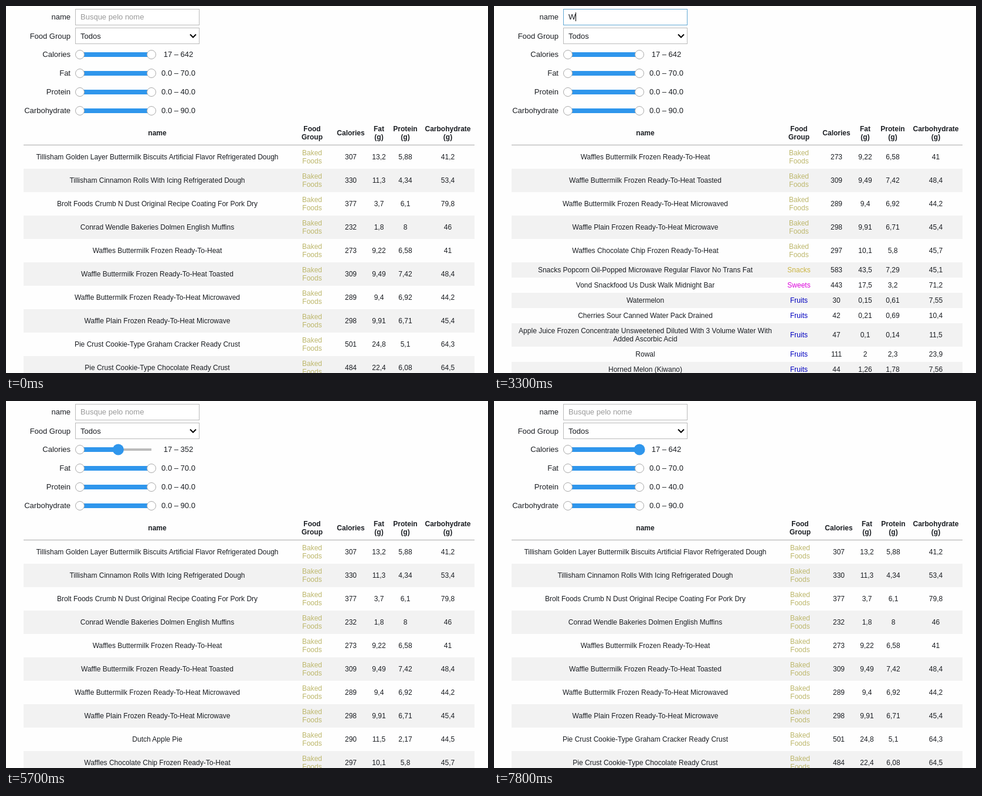
These frames come from a looping animation (822x627 px, 8000 ms). An HTML page:

```html
<!DOCTYPE html>
<html lang="en">
<head>
<meta charset="utf-8">
<title>Food table filter</title>
<style>
html, body { margin: 0; width: 100%; height: 100%; overflow: hidden; background: #fefefe; }
svg { display: block; font-family: "Liberation Sans", Arial, sans-serif; font-size: 13px; fill: #1b1e23; }
.table { font-size: 12px; text-anchor: middle; }
.head { font-weight: bold; }
.box { fill: #fff; stroke: #bbb; }
.knob { fill: #fff; stroke: #aaa; }
</style>
</head>
<body>
<svg id="stage" width="822" height="627" viewBox="0 0 822 627"></svg>
<script>
const LOOP = 8000;
const BLUE = '#2f96ec';
const COLORS = { 'Baked Foods': '#bdb76b', Snacks: '#cbb440', Sweets: '#dc00dc', Fruits: '#0000c0' };

// name | calories | fat | protein | carbohydrate, "#" starts a group, "/" breaks a line
const FOODS = `
#Baked Foods
Tillisham Golden Layer Buttermilk Biscuits Artificial Flavor Refrigerated Dough|307|13,2|5,88|41,2
Tillisham Cinnamon Rolls With Icing Refrigerated Dough|330|11,3|4,34|53,4
Brolt Foods Crumb N Dust Original Recipe Coating For Pork Dry|377|3,7|6,1|79,8
Conrad Wendle Bakeries Dolmen English Muffins|232|1,8|8|46
Waffles Buttermilk Frozen Ready-To-Heat|273|9,22|6,58|41
Waffle Buttermilk Frozen Ready-To-Heat Toasted|309|9,49|7,42|48,4
Waffle Buttermilk Frozen Ready-To-Heat Microwaved|289|9,4|6,92|44,2
Waffle Plain Frozen Ready-To-Heat Microwave|298|9,91|6,71|45,4
Pie Crust Cookie-Type Graham Cracker Ready Crust|501|24,8|5,1|64,3
Pie Crust Cookie-Type Chocolate Ready Crust|484|22,4|6,08|64,5
Dutch Apple Pie|290|11,5|2,17|44,5
Waffles Chocolate Chip Frozen Ready-To-Heat|297|10,1|5,8|45,7
Bread White Wheat|238|2,15|10,7|43,9
Bagels Wheat|250|1,53|10,2|48,9
Crackers Wheat Regular|455|16,4|7,3|70,7
#Snacks
Snacks Popcorn Oil-Popped Microwave Regular Flavor No Trans Fat|583|43,5|7,29|45,1
#Sweets
Ice Creams Vanilla Light|180|4,83|4,78|29,5
Ice Creams Vanilla Rich|249|16,2|3,5|22,3
Desserts Flan Caramel Custard Prepared-From-Recipe|145|4,03|4,53|22,8
Ice Creams Vanilla|207|11|3,5|23,6
Ice Creams Vanilla Light Soft-Serve|126|2,6|4,9|21,8
Sherbet Orange|144|2|1,1|30,4
Vond Snackfood Us Dusk Walk Midnight Bar|443|17,5|3,2|71,2
#Fruits
Watermelon|30|0,15|0,61|7,55
Cherries Sour Canned Water Pack Drained|42|0,21|0,69|10,4
Apple Juice Frozen Concentrate Unsweetened Diluted With 3 Volume Water With/Added Ascorbic Acid|47|0,1|0,14|11,5
Rowal|111|2|2,3|23,9
Horned Melon (Kiwano)|44|1,26|1,78|7,56`;

let group = '';
const foods = [];
for (const line of FOODS.trim().split('\n')) {
  if (line[0] === '#') { group = line.slice(1); continue; }
  const [name, ...nums] = line.split('|');
  foods.push({ name, group, nums, kcal: +nums[0] });
}
// "Horned Melon (Kiwano)" matches through its last word, as does every listed "wa"
const matches = (food, query) => food.name.toLowerCase().includes(query.toLowerCase());

// step tracks: [time, value]
const typed = [[0, ''], [1400, 'W'], [1900, 'Wa'], [3300, 'W'], [3600, '']];
const query = [[0, ''], [1500, 'W'], [1900, 'Wa'], [3400, 'W'], [3700, '']];
const caret = [[0, 0], [500, 1], [1100, 0], [1400, 1], [2500, 0], [3300, 1], [4300, 0]];
const high = [[0, 642], [4700, 637], [4800, 626], [4900, 606], [5100, 560], [5200, 517], [5300, 478],
  [5400, 442], [5500, 408], [5600, 378], [5700, 352], [5800, 332], [5900, 316], [6000, 301],
  [6200, 291], [6500, 296], [7100, 345], [7200, 432], [7300, 529], [7500, 570], [7600, 606], [7800, 642]];
const limit = [[0, 642], [5200, 500], [5400, 442], [5800, 352], [6200, 291], [7100, 345], [7200, 432], [7300, 642]];

function at(track, t) {
  let value;
  for (const [time, v] of track) if (time <= t) value = v;
  return value;
}

const text = (s, x, y, attrs = '') => `<text x="${x}" y="${y}" ${attrs}>${s}</text>`;
const rect = (x, y, w, h, attrs) => `<rect x="${x}" y="${y}" width="${w}" height="${h}" ${attrs}/>`;
const label = (s, y) => text(s, 110, y, 'text-anchor="end"');

// one or two centred lines around a middle
function lines(parts, x, mid, attrs = '') {
  const top = mid + 4 - (parts.length - 1) * 7;
  return parts.map((s, i) => text(s, x, top + i * 14, attrs)).join('');
}

function slider(name, y, range, end = 248, active = false) {
  const knob = x => `<circle class="knob" cx="${x}" cy="${y}" r="7.5"/>`;
  return label(name, y + 4) +
    rect(126, y - 2, 122, 4, 'fill="#bbb"') +
    rect(126, y - 4, end - 126, 8, `fill="${BLUE}"`) +
    knob(126) +
    (active ? `<circle cx="${end}" cy="${y}" r="9.5" fill="${BLUE}"/>` : knob(end)) +
    text(range, 294, y + 4, 'text-anchor="middle"');
}

function searchBox(t) {
  const value = at(typed, t);
  const focused = t >= 500 && t < 4700;
  const selected = t >= 3100 && t < 3300;
  let out = label('name', 23) +
    rect(118.5, 5.5, 211, 27, `class="box" ${focused ? 'style="stroke:#62a8d4"' : ''}`);
  if (selected) out += rect(127, 11, 20, 15, 'fill="#3297fd"');
  out += value
    ? text(value, 127, 23, selected ? 'fill="#fff"' : '')
    : text('Busque pelo nome', 127, 23, 'fill="#999"');
  if (at(caret, t)) {
    const x = [127, 139, 146][value.length];
    out += rect(x, value ? 11 : 12, 1, 15, 'fill="#000"');
  }
  return out;
}

function controls(t) {
  const v = at(high, t);
  return searchBox(t) +
    label('Food Group', 56) +
    rect(118.5, 37.5, 211, 27, 'class="box"') +
    text('Todos', 127, 56) +
    '<path d="M314 48.5l5 5 5-5" fill="none" stroke="#000" stroke-width="2"/>' +
    slider('Calories', 83, `17 – ${v}`, 126 + (v - 17) / 625 * 122, t >= 4400) +
    slider('Fat', 115, '0.0 – 70.0') +
    slider('Protein', 147, '0.0 – 40.0') +
    slider('Carbohydrate', 179, '0.0 – 90.0');
}

function table(t) {
  const q = at(query, t), max = at(limit, t);
  const cols = q === 'Wa' ? [520, 584, 633, 680, 753.5] : [522, 588, 636, 681, 753.5];
  const heads = ['Food/Group', 'Calories', 'Fat/(g)', 'Protein/(g)', 'Carbohydrate/(g)'];
  let out = '<g class="head">' + lines(['name'], 258, 217) +
    heads.map((h, i) => lines(h.split('/'), cols[i], 217)).join('') + '</g>' +
    rect(30, 237, 769, 1, 'fill="#aaa"');
  let y = 238, odd = false;
  for (const food of foods) {
    if (y >= 627) break;
    if (food.kcal > max || !matches(food, q)) continue;
    const name = food.name.split('/'), kind = food.group.split(' ');
    const h = Math.max(name.length, kind.length) > 1 ? 40 : 26;
    const mid = y + h / 2;
    if (odd) out += rect(30, y, 769, h, 'fill="#f2f2f2"');
    out += lines(name, 258, mid) +
      lines(kind, cols[0], mid, `fill="${COLORS[food.group]}"`) +
      food.nums.map((n, i) => lines([n], cols[i + 1], mid)).join('');
    y += h;
    odd = !odd;
  }
  return `<g class="table">${out}</g>`;
}

const stage = document.getElementById('stage');
let shown = '';
function draw(t) {
  const markup = controls(t) + table(t);
  if (markup !== shown) stage.innerHTML = shown = markup;
}

const start = performance.now();
function tick() {
  draw((performance.now() - start) % LOOP);
  requestAnimationFrame(tick);
}
draw(0);
requestAnimationFrame(tick);
</script>
</body>
</html>
```
